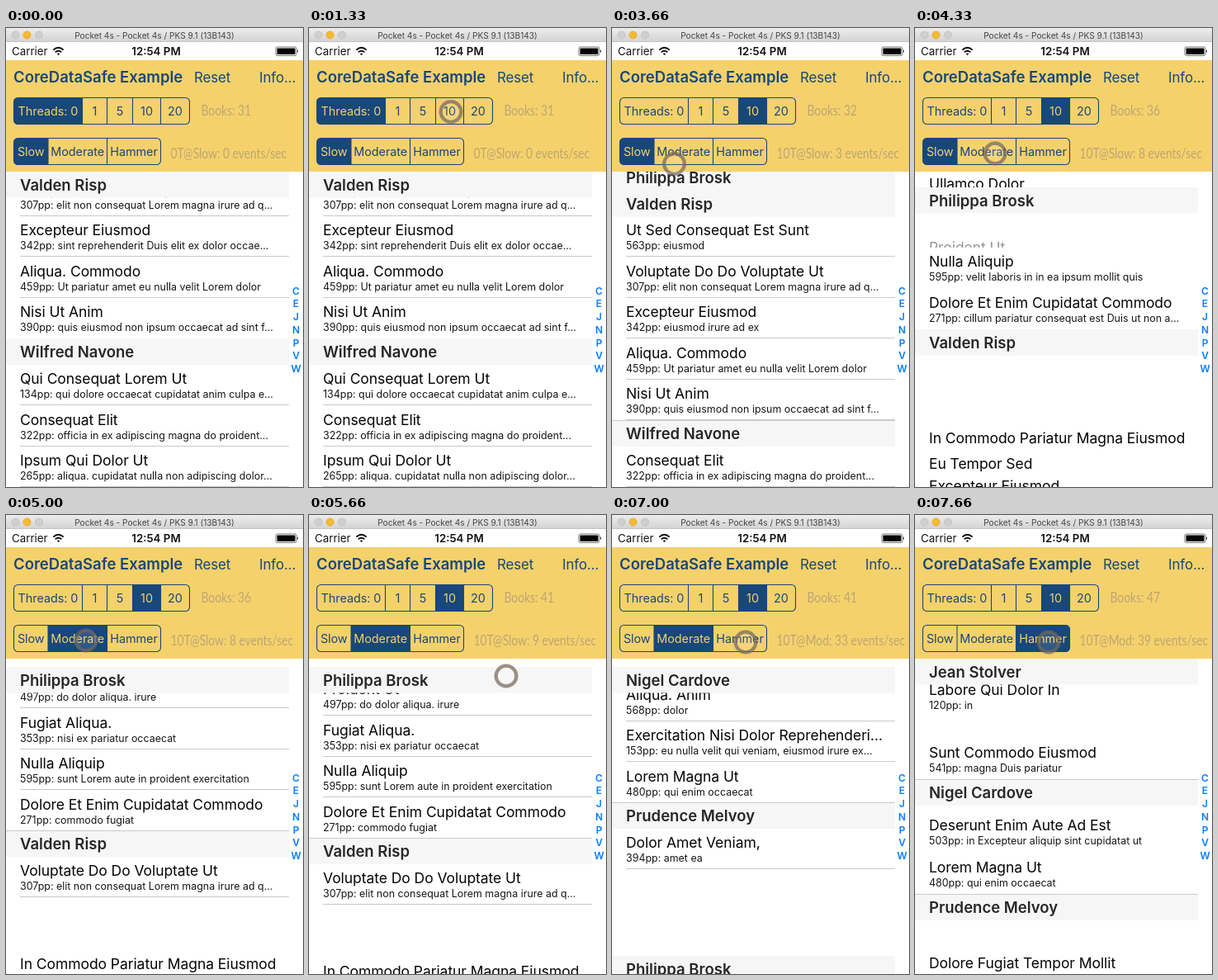
These frames come from a looping animation (360x556 px, 8 s). An HTML page:

```html
<!DOCTYPE html>
<html lang="en">
<head>
<meta charset="utf-8">
<title>CoreDataSafe Example</title>
<style>
  html, body { margin: 0; width: 100%; height: 100%; overflow: hidden; background: #fff; }
  svg { display: block; width: 360px; height: 556px; }
  text { font-family: Inter, Roboto, sans-serif; white-space: pre; }
  .window { font-size: 10.15px; fill: #454545; }
  .status { font-size: 13.3px; fill: #111; }
  .strong { font-weight: 600; }
  .heading { font-size: 18.5px; font-weight: 600; }
  .action { font-size: 16.9px; letter-spacing: -.1px; }
  .segment { font-size: 14.4px; letter-spacing: -.05px; }
  .navy { fill: #184779; }
  .gold { fill: #f5d16c; }
  .condensed { font: 18px Lato, sans-serif; fill: #bda675; }
  .title { font-size: 17.5px; letter-spacing: -.06px; fill: #050505; }
  .detail { font-size: 12.45px; fill: #161616; }
  .section { fill: #262626; }
  .index { font-size: 12px; font-weight: 600; fill: #087dfc; }
  .middle { text-anchor: middle; }
</style>
</head>
<body>
<svg viewBox="0 0 360 556">
  <defs>
    <linearGradient id="chrome" x2="0" y2="1">
      <stop stop-color="#ececec"/><stop offset="1" stop-color="#d3d3d3"/>
    </linearGradient>
    <clipPath id="listArea"><rect y="174" width="360" height="382"/></clipPath>
  </defs>
  <rect width="360" height="556" fill="#fff"/>
  <g id="list" clip-path="url(#listArea)"></g>
  <g id="index"></g>

  <rect width="360" height="17" fill="url(#chrome)"/>
  <path d="M0 16.5H360" stroke="#c4c4c4"/>
  <g stroke="#b9b9b9" stroke-width=".6" fill="#cfcfcf">
    <circle cx="11.5" cy="8.5" r="4.6"/>
    <circle cx="25.5" cy="8.5" r="4.6" fill="#f6b92f" stroke="#dca024"/>
    <circle cx="40" cy="8.5" r="4.6"/>
  </g>
  <text class="window middle" x="180" y="12.5">Pocket 4s - Pocket 4s / PKS 9.1 (13B143)</text>

  <text class="status" x="7" y="33">Carrier</text>
  <g fill="none" stroke="#111" stroke-width="1.9">
    <path d="M57.3 26.6Q63.5 21 69.7 26.6M59.7 29.3Q63.5 26 67.3 29.3"/>
    <path d="M61.8 31.2Q63.5 29.9 65.2 31.2L63.5 33Z" fill="#111" stroke="none"/>
  </g>
  <text class="status strong middle" x="182" y="33">12:54 PM</text>
  <rect x="327" y="23" width="25" height="10.5" rx="2" fill="none" stroke="#555" stroke-width=".8"/>
  <rect x="328.5" y="24.5" width="22" height="7.5" rx=".8" fill="#050505"/>
  <path d="M353 26.3q2 1.9 0 3.8z" fill="#050505"/>

  <rect y="39" width="360" height="135" class="gold"/>
  <text class="heading navy" x="9" y="66">CoreDataSafe Example</text>
  <text class="action navy" x="228" y="66">Reset</text>
  <text class="action navy" x="307" y="66">Info...</text>
  <g id="controls"></g>
  <g id="cursor">
    <circle r="12.2" fill="#fff" fill-opacity=".1" stroke="#75675d" stroke-opacity=".72" stroke-width="4"/>
    <circle r="14.5" fill="none" stroke="#75675d" stroke-opacity=".25"/>
  </g>
</svg>
<script>
const $ = id => document.getElementById(id);
const LOOP = 8000, HEADER = 31.5, ROW = 49.5;

const head = (name, y, line = true) => ({ name, y, line });
const rows = (y, line, ...books) => books.map((book, i) => {
  const [title, detail = '', opacity = 1] = book.split('|');
  return { title, detail, opacity, line, y: y + i * ROW };
});

const valden = 'Valden Risp', wilfred = 'Wilfred Navone', philippa = 'Philippa Brosk',
      nigel = 'Nigel Cardove', prudence = 'Prudence Melvoy', jean = 'Jean Stolver';
const voluptate = 'Voluptate Do Do Voluptate Ut|307pp: elit non consequat Lorem magna irure ad q...';
const aliqua = 'Aliqua. Commodo|459pp: Ut pariatur amet eu nulla velit Lorem dolor';
const nisi = 'Nisi Ut Anim|390pp: quis eiusmod non ipsum occaecat ad sint f...';
const consequat = 'Consequat Elit|322pp: officia in ex adipiscing magna do proident...';
const ipsum = 'Ipsum Qui Dolor Ut|265pp: aliqua. cupidatat nulla non adipiscing dolor...';
const lorem = 'Lorem Magna Ut|480pp: qui enim occaecat';

const opening = line => ({ pin: 174, items: [
  head(valden, 140), ...rows(178.5, true, voluptate,
    'Excepteur Eiusmod|342pp: sint reprehenderit Duis elit ex dolor occae...', aliqua),
  ...rows(327, false, nisi),
  head(wilfred, 376.5, line), ...rows(408, true,
    'Qui Consequat Lorem Ut|134pp: qui dolore occaecat cupidatat anim culpa e...', consequat, ipsum)
] });

const scenes = {
  idle: opening(false),
  started: opening(true),
  inserted: { pin: 174, items: [
    head(philippa, 100, false), head(valden, 197, false),
    ...rows(228, true, 'Ut Sed Consequat Est Sunt|563pp: eiusmod', voluptate,
      'Excepteur Eiusmod|342pp: eiusmod irure ad ex', aliqua, nisi),
    head(wilfred, 475.5), ...rows(507, true, consequat, ipsum)
  ] },
  spreading: { pin: 193, items: [
    ...rows(171.5, false, 'Ullamco Dolor'),
    head(philippa, 193, false),
    ...rows(249, false, 'Proident Ut||.42'),
    ...rows(266, false, 'Nulla Aliquip|595pp: velit laboris in in ea ipsum mollit quis',
      'Dolore Et Enim Cupidatat Commodo|271pp: cillum pariatur consequat est Duis ut non a...'),
    head(valden, 365, false),
    ...rows(480, false, 'In Commodo Pariatur Magna Eiusmod'),
    ...rows(510.5, false, 'Eu Tempor Sed'), ...rows(537.5, false, 'Excepteur Eiusmod')
  ] },
  scrolled: { pin: 184, items: [
    head(nigel, 160, false),
    ...rows(200.5, true, 'Aliqua. Anim|568pp: dolor',
      'Exercitation Nisi Dolor Reprehenderi...|153pp: eu nulla velit qui veniam, eiusmod irure ex...', lorem),
    head(prudence, 348.5), ...rows(380, true, 'Dolor Amet Veniam,|394pp: amet ea'),
    head(philippa, 534, false),
    ...rows(565, true, 'Proident Ut|497pp: do dolor aliqua. irure',
      'Fugiat Aliqua.|353pp: nisi ex pariatur occaecat',
      'Nulla Aliquip|595pp: sunt Lorem aute in proident exercitation',
      'Dolore Et Enim Cupidatat Commodo|271pp: commodo fugiat'),
    head(valden, 762.5), ...rows(794, true, voluptate),
    ...rows(907, false, 'In Commodo Pariatur Magna Eiusmod')
  ] },
  hammered: { pin: 174, items: [
    head(jean, 140, false),
    ...rows(195, false, 'Labore Qui Dolor In|120pp: in'),
    ...rows(271, false, 'Sunt Commodo Eiusmod|541pp: magna Duis pariatur'),
    head(nigel, 320.5),
    ...rows(359, false, 'Deserunt Enim Aute Ad Est|503pp: in Excepteur aliquip sint cupidatat ut'),
    ...rows(410, false, lorem),
    head(prudence, 459.5), ...rows(526, false, 'Dolore Fugiat Tempor Mollit')
  ] }
};

// Each step lists only what changes from the step before it.
const changes = [
  { at: 0, scene: 'idle', shift: 0, books: 31, mode: '0T@Slow', rate: 0, thread: 0, speed: 0, cursor: null },
  { at: 660, cursor: [270, 102] },
  { at: 1000, cursor: [161, 102] },
  { at: 1330, cursor: [172, 101.5] },
  { at: 1660, cursor: [165, 101.5] },
  { at: 2000, cursor: [165, 100.5] },
  { at: 2330, thread: 3 },
  { at: 2660, scene: 'started', cursor: [115, 153] },
  { at: 3000, scene: 'inserted', shift: -23, mode: '10T@Slow', rate: 1, cursor: [75.5, 164.5] },
  { at: 3330, shift: -11, books: 32, rate: 3 },
  { at: 3660, shift: 0 },
  { at: 4000, scene: 'spreading', shift: -84, rate: 6 },
  { at: 4330, shift: 0, books: 36, rate: 8, cursor: [97, 152] },
  { at: 4660, scene: 'scrolled', shift: -389, speed: 1 },
  { at: 5000, shift: -380 },
  { at: 5330, shift: -374, books: 41, rate: 9, cursor: [238, 183] },
  { at: 5660, shift: -371, cursor: [239, 195] },
  { at: 6000, shift: -278, cursor: [238, 184] },
  { at: 6330, shift: -185, mode: '10T@Mod', rate: 21, cursor: [158, 159] },
  { at: 6660, shift: -93, cursor: [162, 158] },
  { at: 7000, shift: 0, rate: 33, cursor: [162, 154] },
  { at: 7330, scene: 'hammered', shift: -55, books: 47 },
  { at: 7660, shift: 0, rate: 39, speed: 2 }
];
let last = {};
const steps = changes.map(change => last = { ...last, ...change });

const text = (cls, x, y, value) => `<text class="${cls}" x="${x}" y="${y}">${value}</text>`;
const rule = (x, y) => `<path d="M${x} ${Math.floor(y) + .5}H343" stroke="#c9c8cc"/>`;

function drawRow(row, shift) {
  const y = row.y + shift;
  return `<rect y="${y}" width="343" height="${ROW}" fill="#fff"/><g opacity="${row.opacity}">` +
    text('title', 17, Math.round(y + 23.2), row.title) +
    text('detail', 17, Math.round(y + 40.2), row.detail) + '</g>' +
    (row.line ? rule(17, y + ROW - 1) : '');
}

function drawList({ scene, shift }) {
  const { pin, items } = scenes[scene];
  const heads = items.filter(item => item.name);
  const body = items.filter(item => item.title).map(row => drawRow(row, shift));
  const bars = heads.map((bar, i) => {
    const limit = i + 1 < heads.length ? heads[i + 1].y + shift - HEADER : Infinity;
    const y = Math.min(Math.max(bar.y + shift, pin), limit);
    return `<rect y="${y}" width="343" height="${HEADER}" fill="#f6f6f6"/>` +
      (bar.line && y > pin ? rule(0, y) : '') + text('heading section', 17, y + 22.5, bar.name);
  });
  return body.join('') + bars.join('');
}

function drawSegments(y, edges, labels, selected) {
  const left = edges[0], right = edges[edges.length - 1], last = labels.length - 1;
  const cells = labels.map((label, i) => {
    const a = edges[i], b = edges[i + 1], on = i === selected;
    const l = i === 0 ? 5 : 0, r = i === last ? 5 : 0;
    const fill = on ? `<path class="navy" d="M${a + l} ${y}H${b - r}q${r} 0 ${r} ${r}V${y + 32 - r}q0 ${r} ${-r} ${r}H${a + l}q${-l} 0 ${-l} ${-l}V${y + l}q0 ${-l} ${l} ${-l}"/>` : '';
    const divider = i ? `<path d="M${a} ${y}v32" stroke="#184779" stroke-width="1.1"/>` : '';
    return fill + divider + text(`segment middle ${on ? 'gold' : 'navy'}`, (a + b) / 2, y + 21.5, label);
  });
  return cells.join('') + `<rect x="${left}" y="${y}" width="${right - left}" height="32" rx="5" fill="none" stroke="#184779" stroke-width="1.1"/>`;
}

const condensed = (x, y, value) =>
  `<g transform="translate(${x} ${y}) scale(.77 1)">${text('condensed', 0, 0, value)}</g>`;

function draw(step) {
  $('list').innerHTML = drawList(step);
  $('controls').innerHTML =
    drawSegments(84.5, [9.5, 92.5, 122.5, 153.5, 187.5, 222.5], ['Threads: 0', '1', '5', '10', '20'], step.thread) +
    drawSegments(133.5, [9.5, 51, 122.5, 187.5], ['Slow', 'Moderate', 'Hammer'], step.speed) +
    condensed(236.5, 106, `Books: ${step.books}`) +
    condensed(199.5, 158, `${step.mode}: ${step.rate} events/sec`);
  $('cursor').setAttribute('visibility', step.cursor ? 'visible' : 'hidden');
  if (step.cursor) $('cursor').setAttribute('transform', `translate(${step.cursor})`);
}

$('index').innerHTML = [...'CEJNPVW']
  .map((letter, i) => text('index middle', 351.5, 322.7 + i * 15.75, letter)).join('');

const start = performance.now();
let shown;
function tick() {
  const time = (performance.now() - start) % LOOP;
  const step = steps.filter(({ at }) => at <= time).pop();
  if (step !== shown) draw(shown = step);
  requestAnimationFrame(tick);
}
tick();
</script>
</body>
</html>
```
